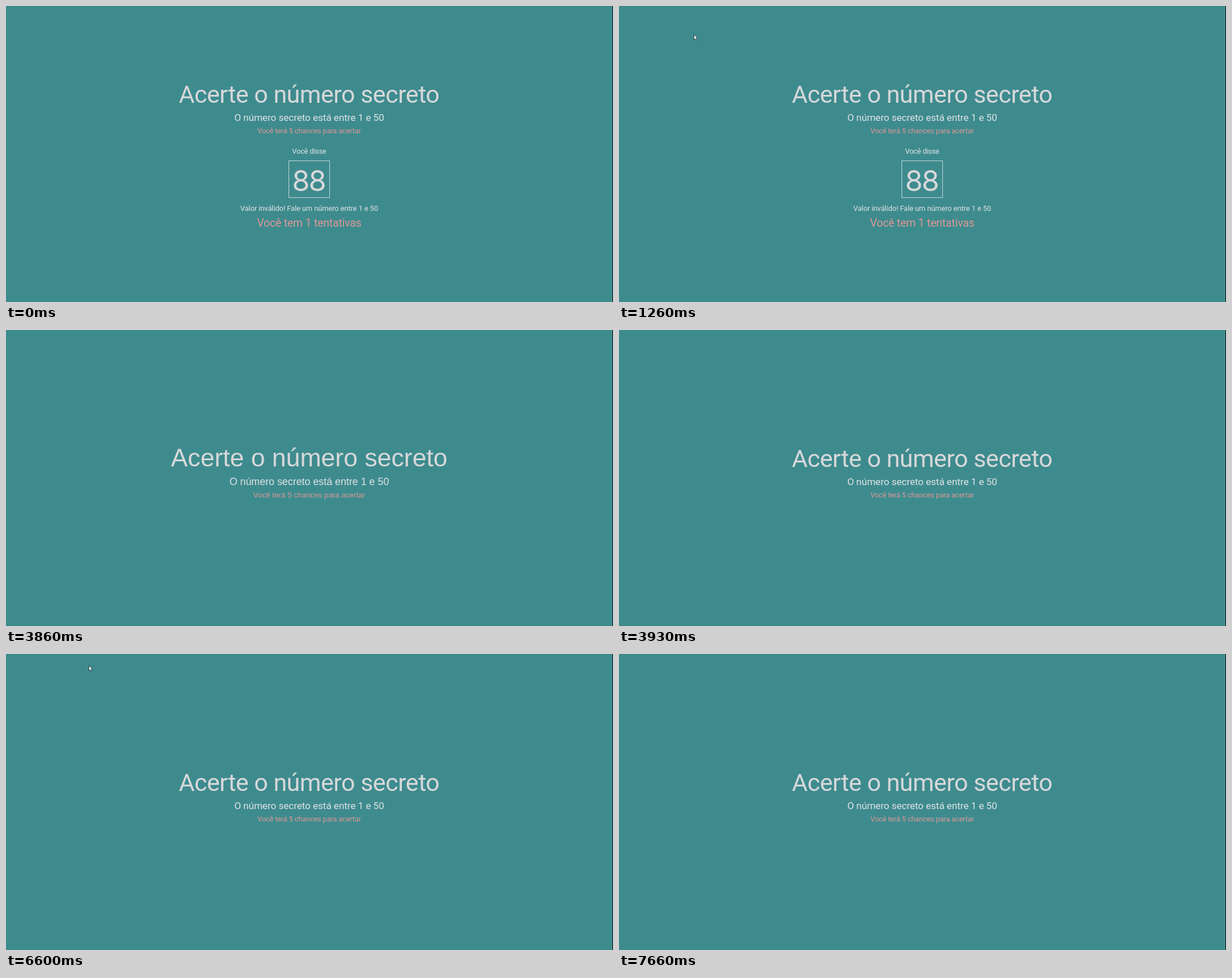
Write an HTML page with a canvas that moves like this. It is 1072 px wide and 523 px high and loops after 8 s.

```html
<!DOCTYPE html>
<html lang="pt-BR">
<head>
<meta charset="utf-8">
<title>Acerte o número secreto</title>
<style>
html, body { margin: 0; width: 100%; height: 100%; overflow: hidden; background: #3e8b8e; }
canvas { display: block; }
</style>
</head>
<body>
<canvas id="stage" width="1072" height="523"></canvas>
<script>
const ctx = document.getElementById('stage').getContext('2d');
const LOOP = 8000;
const TICK = 1000 / 15;
const CENTER = 535.5;
const COLORS = { bg: '#3e8b8e', title: '#d7d8da', text: '#e0e3e4', pink: '#dc9896', edge: '#000' };
const WEB = 'Roboto, sans-serif';
const FALLBACK = '"Liberation Sans", Arial, sans-serif';
const DIGITS = 'Inter, sans-serif';

const TITLE = 'Acerte o número secreto';
const RANGE = 'O número secreto está entre 1 e 50';
const CHANCES = 'Você terá 5 chances para acertar';

const easeOut = k => 1 - (1 - k) ** 2;
const easeIn = k => k * k;
const mix = (a, b, k) => a + (b - a) * k;

// Each glide holds its end point until the pointer hides or the next glide starts
const GLIDES = [
  { start: 330, end: 800, hide: 1060, from: [731, 376], to: [169, 46], ease: easeOut },
  { start: 1060, end: 1260, hide: 2200, from: [169, 46], to: [132, 50], ease: easeOut },
  { start: 6400, end: 6600, hide: 6730, from: [172, 42], to: [146, 20], ease: easeOut },
  { start: 6730, end: 7600, hide: 7660, from: [146, 20], to: [1062, 18], ease: easeIn, sag: 58 }
];

function label(text, y, size, spacing, color, family = WEB) {
  ctx.font = `${size}px ${family}`;
  ctx.letterSpacing = spacing + 'px';
  ctx.fillStyle = color;
  ctx.fillText(text, CENTER + spacing / 2, y);
}

function heading(dy) {
  label(TITLE, 170.5 + dy, 43, -0.5, COLORS.title);
  label(RANGE, 202.5 + dy, 17.2, -0.08, COLORS.text);
  label(CHANCES, 224.5 + dy, 12.9, -0.18, COLORS.pink);
}

function fallbackHeading() {
  label(TITLE, 240.5, 44.6, 0, COLORS.title, FALLBACK);
  label(RANGE, 273.5, 17.85, 0, COLORS.text, FALLBACK);
  label(CHANCES, 296, 13.4, 0, COLORS.pink, FALLBACK);
}

function guess() {
  label('Você disse', 260.5, 12.9, -0.25, COLORS.text);
  ctx.strokeStyle = '#c5dadb';
  ctx.lineWidth = 1;
  ctx.strokeRect(499.5, 273.5, 72, 65);
  label('88', 326.8, 50.5, -2, COLORS.title, DIGITS);
  label('Valor inválido! Fale um número entre 1 e 50', 362, 12.9, -0.09, COLORS.text);
  label('Você tem 1 tentativas', 389.5, 19.4, -0.15, COLORS.pink);
}

function pointer({ start, end, from, to, ease, sag = 0 }, t) {
  const k = ease(Math.min(1, Math.max(0, (t - start) / (end - start))));
  const x = mix(from[0], to[0], k);
  const y = mix(from[1], to[1], k) + sag * Math.sin(Math.PI * k);
  ctx.save();
  ctx.translate(Math.round(x) + 0.5, Math.round(y) + 0.5);
  ctx.fillStyle = '#fff';
  ctx.strokeStyle = '#14292b';
  ctx.lineWidth = 0.8;
  const arrow = new Path2D('M0 0V9L2 7.2L3.5 10.5L5 9.8L3.6 6.6H6.2Z');
  ctx.fill(arrow);
  ctx.stroke(arrow);
  ctx.restore();
}

function draw(t) {
  ctx.fillStyle = COLORS.bg;
  ctx.fillRect(0, 0, 1072, 523);
  ctx.textAlign = 'center';
  ctx.textBaseline = 'alphabetic';

  if (t < 3860) {
    heading(0);
    guess();
  } else if (t < 3930) {
    fallbackHeading();
  } else {
    heading(71.5);
  }

  // The pointer advances at 15 steps per second
  const stepped = Math.floor((t + 10) / TICK) * TICK;
  const glide = GLIDES.find(({ start, hide }) => t >= start && t < hide);
  if (glide) pointer(glide, stepped);

  ctx.fillStyle = COLORS.edge;
  ctx.fillRect(1071, 0, 1, 523);
}

const begin = performance.now();
function frame() {
  draw((performance.now() - begin) % LOOP);
  requestAnimationFrame(frame);
}
frame();
</script>
</body>
</html>
```
